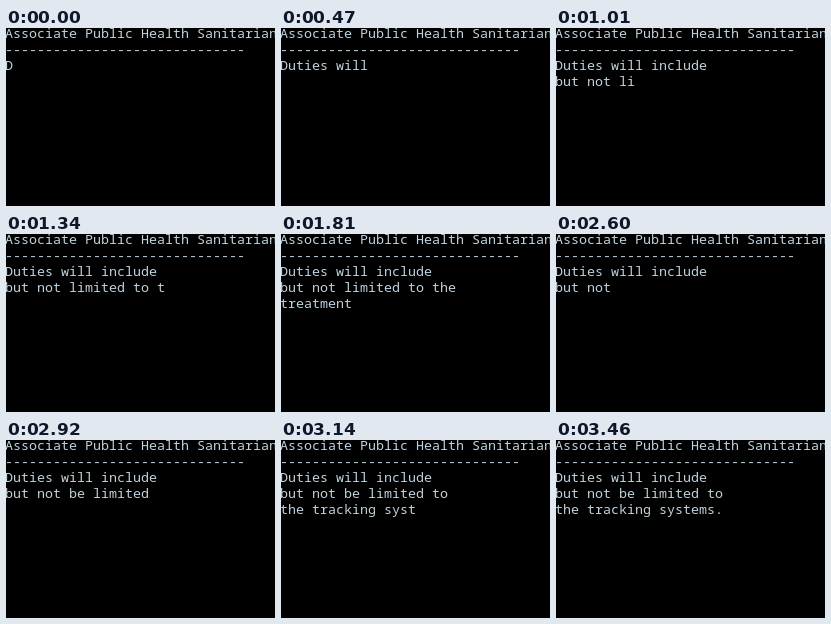
Recreate the animation shown at these times as an HTML page. Size 269 by 178 pixels, loop 3760 ms.

```html
<!DOCTYPE html>
<html lang="en">
<head>
<meta charset="utf-8">
<title>Console typing</title>
<style>
  html, body { margin: 0; width: 100%; height: 100%; overflow: hidden; background: #000; }
  svg { display: block; width: 269px; height: 178px; }
  text {
    font: 13.3333px "Noto Sans Mono", "DejaVu Sans Mono", monospace;
    font-variant-ligatures: none;
    fill: #bfd2de;
    white-space: pre;
  }
</style>
</head>
<body>
<svg viewBox="0 0 269 178"></svg>
<script>
const LOOP = 3760;
const TICK = 78.6; // screen refresh while typing, ms
const LEAD = 12;
const LINE = 16;

const heading = ["Associate Public Health Sanitarian", "-".repeat(30)];
const first = "Duties will include\nbut not limited to the\ntreatment";
const second = "Duties will include\nbut not be limited to\nthe tracking systems.";
const ERASED = 33; // tick at which only the shared beginning is left

// [tick, characters typed]: type, pause, erase, retype, pause, finish
const keys = [
  [0, 1], [6, 12], [13, 30], [21, 49], [22, 49], [23, 52],
  [29, 37], [ERASED, 28], [37, 38], [40, 59], [41, 59], [44, 63]
];

const svg = document.querySelector("svg");
const rows = Array.from({ length: 5 }, (_, i) => {
  const row = document.createElementNS(svg.namespaceURI, "text");
  row.setAttribute("x", -1);
  row.setAttribute("y", 10 + i * LINE);
  return svg.appendChild(row);
});

function countAt(tick) {
  const next = keys.findIndex(([k]) => k > tick);
  if (next < 0) return keys[keys.length - 1][1];
  const [k0, n0] = keys[next - 1];
  const [k1, n1] = keys[next];
  return Math.round(n0 + (n1 - n0) * (tick - k0) / (k1 - k0));
}

function textAt(tick) {
  return (tick < ERASED ? first : second).slice(0, countAt(tick));
}

const start = performance.now();
let shown = -1;

function draw(now) {
  const t = Math.max(0, now - start) % LOOP;
  const tick = Math.floor((t + LEAD) / TICK);
  if (tick !== shown) {
    const lines = [...heading, ...textAt(tick).split("\n")];
    rows.forEach((row, i) => { row.textContent = lines[i] || ""; });
    shown = tick;
  }
  requestAnimationFrame(draw);
}

draw(start);
</script>
</body>
</html>
```
